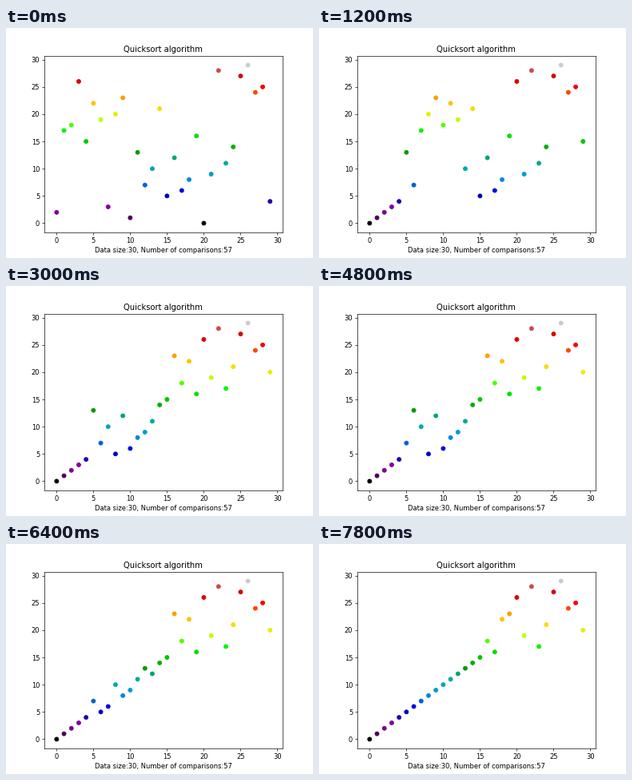
A matplotlib script for the animation above (8 s loop, 384 px wide and 288 px high).

```python
import numpy as np
import matplotlib.pyplot as plt
from matplotlib.animation import FuncAnimation

# The unsorted input; all motion follows from sorting it.
DATA = [2, 17, 18, 26, 15, 22, 19, 3, 20, 23, 1, 13, 7, 10, 21,
        5, 12, 6, 8, 16, 0, 9, 28, 11, 14, 27, 29, 24, 25, 4]
FRAMES = 40
INTERVAL = 200
MARGIN = 0.05
RADIUS = 3 / 100  # marker allowance in inches


def quicksort(a, lo, hi):
    """Sort a in place, yielding a copy after every swap in the scan."""
    if lo >= hi:
        return
    pivot, i = a[hi], lo
    for j in range(lo, hi):
        if a[j] < pivot:
            a[i], a[j] = a[j], a[i]
            i += 1
            yield a.copy()
    a[i], a[hi] = a[hi], a[i]
    yield from quicksort(a, lo, i - 1)
    yield from quicksort(a, i + 1, hi)


def limits(top, inches):
    """Range 0..top, widened by the marker radius and then the margin."""
    grow = 1 + 2 * MARGIN
    share = grow * RADIUS / inches
    marker = share * top / (1 - 2 * share)
    pad = MARGIN * top + grow * marker
    return -pad, top + pad


n = len(DATA)
steps = list(quicksort(DATA.copy(), 0, n - 1))
x = np.arange(n)

fig, ax = plt.subplots(figsize=(6.4, 4.8), dpi=60)
dots = ax.scatter(x, steps[0], c=steps[0], cmap="nipy_spectral",
                  vmin=0, vmax=n - 1)
width, height = fig.get_size_inches() * ax.get_position().size
ticks = range(0, n + 1, 5)
ax.set(xticks=ticks, yticks=ticks)
ax.set(xlim=limits(n - 1, width), ylim=limits(n - 1, height),
       title="Quicksort algorithm",
       xlabel=f"Data size:{n}, Number of comparisons:{len(steps)}")


def update(frame):
    values = np.array(steps[frame])
    dots.set_offsets(np.column_stack([x, values]))
    dots.set_array(values)
    return (dots,)


anim = FuncAnimation(fig, update, frames=FRAMES, interval=INTERVAL,
                     repeat=True, repeat_delay=0)
plt.show()
```
